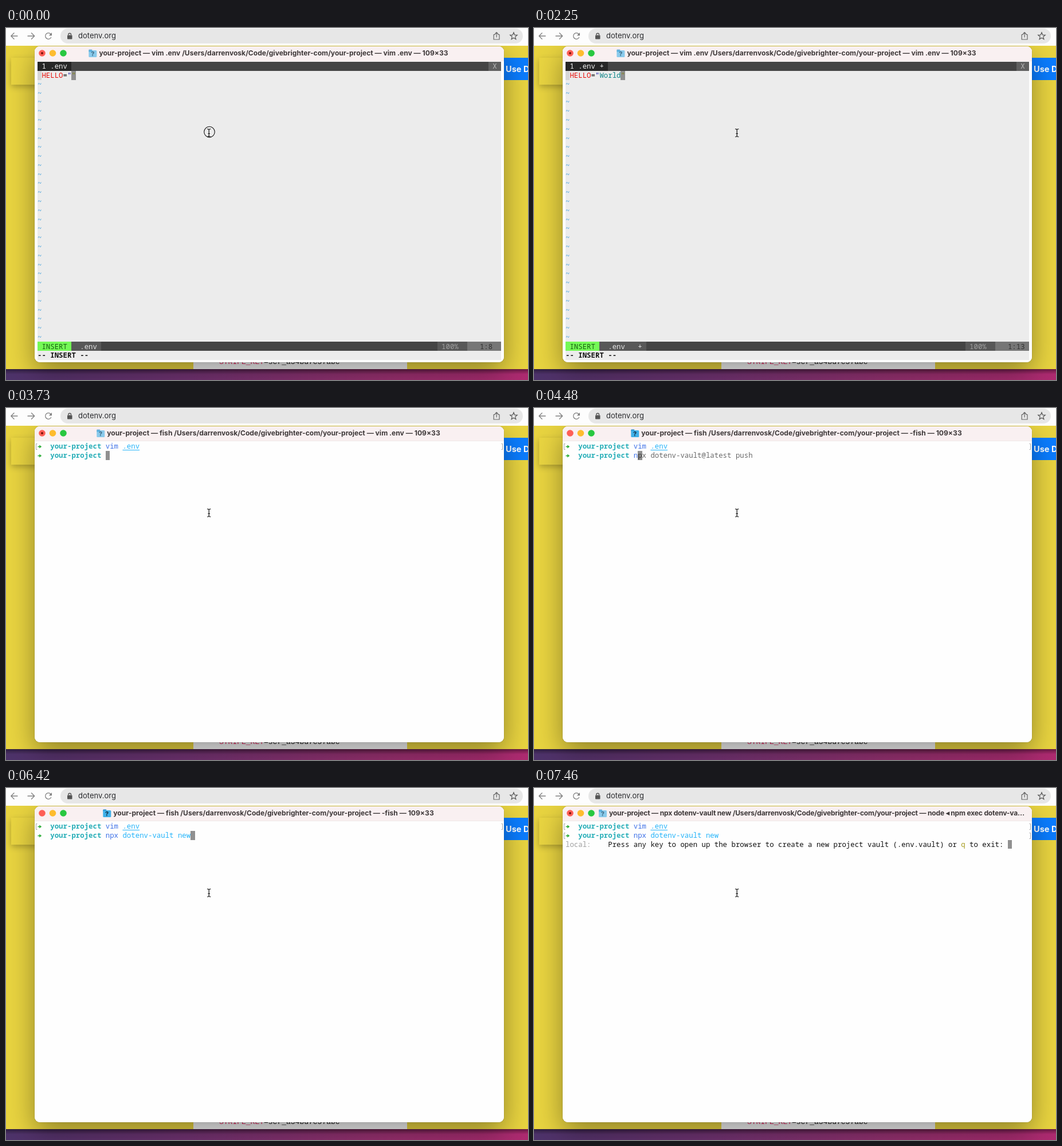
Recreate the animation shown at these times as an HTML page with a canvas. Size 911 by 615 pixels, loop 8 s.

```html
<!DOCTYPE html>
<html lang="en">
<head>
<meta charset="utf-8">
<title>Terminal session</title>
<style>
  html, body { margin: 0; width: 100%; height: 100%; overflow: hidden; background: #e8d33f; }
  canvas { display: block; width: 911px; height: 615px; }
</style>
</head>
<body>
<canvas id="stage" width="911" height="615"></canvas>
<script>
const W = 911, H = 615, LOOP = 8000;
const MONO = '"Noto Sans Mono", "DejaVu Sans Mono", monospace';
const SANS = 'Inter, "Open Sans", sans-serif';
const WIN = { x: 50, y: 32, w: 819, h: 552, r: 9 };
const PAGE = { top: 31, bottom: 596 };
const GRID = { x: 55, y: 59, cw: 7.422, rh: 15.79, cols: 109 };
const GRAY = '#909090';

const stage = document.getElementById('stage');
let g = stage.getContext('2d');

const colX = c => GRID.x + c * GRID.cw;
const rowY = r => GRID.y + r * GRID.rh;

// Last entry whose time has come
const latest = (steps, t) => steps.findLast(s => s[0] <= t);

function rect(x, y, w, h, color) {
  g.fillStyle = color;
  g.fillRect(x, y, w, h);
}

function roundRect(x, y, w, h, r, color) {
  g.fillStyle = color;
  g.beginPath();
  g.roundRect(x, y, w, h, r);
  g.fill();
}

function disc(x, y, r, color) {
  g.fillStyle = color;
  g.beginPath();
  g.arc(x, y, r, 0, 7);
  g.fill();
}

// Each path is a flat list of x, y pairs.
function lines(color, width, ...paths) {
  g.strokeStyle = color;
  g.lineWidth = width;
  g.beginPath();
  for (const p of paths) {
    g.moveTo(p[0], p[1]);
    for (let i = 2; i < p.length; i += 2) g.lineTo(p[i], p[i + 1]);
  }
  g.stroke();
}

function label(str, x, y, font, color) {
  g.font = font;
  g.fillStyle = color;
  g.fillText(str, x, y);
}

// Terminal cells
function cells(row, from, to, color) {
  const x = Math.round(colX(from)), y = Math.round(rowY(row));
  rect(x, y, Math.round(colX(to)) - x, Math.round(rowY(row + 1)) - y, color);
}

function put(row, col, str, color, weight = 400) {
  g.font = `${weight} 12.37px ${MONO}`;
  g.fillStyle = color;
  const y = Math.round(rowY(row) + 12.2);
  [...str].forEach((ch, i) => {
    if (ch !== ' ') g.fillText(ch, colX(col + i), y);
  });
}

function block(row, col) {
  cells(row, col, col + 1, GRAY);
}

// Browser behind the terminal window, drawn once
function drawToolbar() {
  rect(0, 0, W, PAGE.top, '#fdfdfd');
  roundRect(95, 1, 807, 26, 13, '#e7e7e7');
  const ink = '#808080';
  g.lineCap = 'round';
  lines(ink, 1.3, [9, 14, 20, 14], [14, 8.8, 8.8, 14, 14, 19.2]);
  lines(ink, 1.3, [38, 14, 49, 14], [44.5, 8.8, 49.7, 14, 44.5, 19.2]);

  g.beginPath();
  g.arc(74, 14, 5.3, 0.5, 5.5);
  g.stroke();
  g.fillStyle = ink;
  g.beginPath();
  g.moveTo(80, 8);
  g.lineTo(80, 13.2);
  g.lineTo(74.8, 13.2);
  g.fill();

  roundRect(107, 12.5, 8.5, 7, 1, '#555');
  g.strokeStyle = '#555';
  g.lineWidth = 1.4;
  g.beginPath();
  g.arc(111.2, 11.7, 2.4, Math.PI, 0);
  g.stroke();
  label('dotenv.org', 126, 18, `400 13px ${SANS}`, '#2b2c2f');

  lines('#666', 1.2, [853.5, 11.5, 851.2, 11.5, 851.2, 20, 861, 20, 861, 11.5, 858.7, 11.5],
    [856.1, 16, 856.1, 8], [853.3, 10.4, 856.1, 7.6, 858.9, 10.4]);

  g.strokeStyle = '#555';
  g.beginPath();
  for (let i = 0; i < 10; i++) {
    const r = i % 2 ? 2.9 : 6.6, a = i * Math.PI / 5 - Math.PI / 2;
    g.lineTo(886 + r * Math.cos(a), 14.4 + r * Math.sin(a));
  }
  g.closePath();
  g.stroke();
  g.lineCap = 'butt';
}

function drawDesk() {
  const y = PAGE.bottom;
  const grad = g.createLinearGradient(0, 0, W, 0);
  grad.addColorStop(0, '#4c3269');
  grad.addColorStop(0.35, '#713271');
  grad.addColorStop(0.7, '#96306f');
  grad.addColorStop(1, '#ae2a70');
  rect(0, y, W, H - y, grad);
  const shade = g.createLinearGradient(0, y, 0, y + 9);
  shade.addColorStop(0, 'rgba(0,0,0,.4)');
  shade.addColorStop(1, 'rgba(0,0,0,0)');
  rect(0, y, W, 9, shade);
}

function withShadow(color, blur, dy, draw) {
  g.save();
  g.shadowColor = color;
  g.shadowBlur = blur;
  g.shadowOffsetY = dy;
  draw();
  g.restore();
}

function drawBackdrop() {
  rect(0, 0, W, H, '#e9d440');
  withShadow('rgba(0,0,0,.25)', 10, 4, () => rect(9, 52, 48, 47, '#ead541'));
  rect(850, 52, 61, 39, '#0a7cff');
  label('Use Dotenv', 872, 77, `700 14.6px ${SANS}`, '#fff');

  rect(327, 560, 373, PAGE.bottom - 560, '#f4f4f4');
  const code = '13px "Liberation Mono", monospace';
  label('STRIPE_KEY', 372, 587, code, '#e0245e');
  label('=scr_a34bd7c57abc', 450, 587, code, '#111');
  drawDesk();

  withShadow('rgba(0,0,0,.38)', 48, 17,
    () => roundRect(WIN.x, WIN.y, WIN.w, WIN.h, WIN.r, '#fff'));
  drawToolbar();
  roundRect(WIN.x - 0.5, WIN.y - 0.5, WIN.w + 1, WIN.h + 1, WIN.r, 'rgba(0,0,0,.15)');
  roundRect(WIN.x, WIN.y, WIN.w, WIN.h, WIN.r, '#fefefe');
  roundRect(WIN.x, WIN.y, WIN.w, 26, [WIN.r, WIN.r, 0, 0], '#f9f0f1');
  rect(WIN.x, 57.5, WIN.w, 0.5, '#e4dcdc');
}

const backdrop = document.createElement('canvas');
backdrop.width = W;
backdrop.height = H;

// Title bar
const HOME = '/Users/darrenvosk/Code/givebrighter-com/your-project';
const titles = [
  [0, `vim .env ${HOME} — vim .env — 109×33`, true],
  [3730, `fish ${HOME} — vim .env — 109×33`, true],
  [3880, `fish ${HOME} — -fish — 109×33`, false],
  [6860, `npx dotenv-vault new ${HOME} — node ◂ npx dotenv-vault n…`, true],
  [7460, `npx dotenv-vault new ${HOME} — node ◂ npm exec dotenv-va…`, true],
];

function drawFolder(x, busy) {
  g.globalAlpha = busy ? 0.6 : 1;
  roundRect(x, 37.5, 6, 4, 1, '#2088c4');
  roundRect(x, 39, 14, 12, 1.5, '#3fb0e8');
  label('?', x + 3.8, 49, `700 11px ${SANS}`, '#0f2c42');
  g.globalAlpha = 1;
}

function drawTitle(t) {
  const [, text, busy] = latest(titles, t);
  ['#fe5f57', '#febc2e', '#28c840'].forEach((c, i) => disc(63 + i * 18.5, 44, 5.8, c));
  if (busy) disc(63, 44, 2, '#7d1109');

  const str = 'your-project — ' + text;
  const left = 113, right = 862, gap = 18;
  g.font = `700 12.1px ${SANS}`;
  // Long titles are set tighter.
  if (g.measureText(str).width > right - left - gap) g.letterSpacing = '-0.2px';
  const x = Math.max(left, 458 - (g.measureText(str).width + gap) / 2);
  label(str, x + gap, 48.3, g.font, '#3e393a');
  g.letterSpacing = '0px';
  drawFolder(x, busy);
}

// Editor
const words = [[0, ''], [900, 'W'], [1500, 'Wo'], [1800, 'Wor'], [2100, 'Worl'], [2250, 'World']];
const commands = [[0, ''], [2990, ':'], [3140, ':w'], [3290, ':wq']];

function drawEditor(t) {
  const word = latest(words, t)[1];
  const command = latest(commands, t)[1];
  const insert = t < 2700, dirty = word !== '';
  const end = GRID.cols;

  rect(55, 59, 809, 521, '#ececec');

  cells(0, 0, end, '#444444');
  cells(0, 0, dirty ? 10 : 8, '#262626');
  put(0, 1, dirty ? '1 .env +' : '1 .env', '#eeeeee');
  cells(0, 106, end, '#606060');
  put(0, 107, 'X', '#bcbcbc');

  cells(1, 0, 1, '#d6d6d6');
  const caret = insert ? 8 + word.length : 12;
  if (!command) block(1, caret);
  put(1, 1, 'HELLO', '#e8100c');
  put(1, 6, '=', '#111');
  put(1, 7, '"', '#1a1aa8');
  put(1, 8, word, '#0c8588');
  put(1, 8 + word.length, '"', insert ? '#7c8212' : '#0c6f78');
  for (let r = 2; r < 31; r++) put(r, 0, '~', '#4ba3dc');

  cells(31, 0, end, '#444444');
  cells(31, 0, 8, insert ? '#74f956' : '#82d3fb');
  put(31, 1, insert ? 'INSERT' : 'NORMAL', insert ? '#17600f' : '#1a4a66');
  cells(31, 8, dirty ? 19 : 15, '#585858');
  put(31, 10, dirty ? '.env   +' : '.env', '#e4e4e4');
  cells(31, 94, 101, '#585858');
  put(31, 95, '100%', '#a0a0a0');
  cells(31, 101, end, '#767676');
  put(31, 104, `1:${caret}`, '#303030');

  if (insert) put(32, 0, '-- INSERT --', '#111', 700);
  else if (command) {
    put(32, 0, command, '#111');
    block(32, command.length);
  }
}

// Shell
const FULL = 'npx dotenv-vault new';
const HINT = 'npx dotenv-vault@latest push';
// Time and number of typed characters
const keys = [
  [0, 0], [4480, 1], [4630, 3], [4780, 5], [4930, 7], [5080, 9], [5230, 11],
  [5830, 13], [5980, 15], [6130, 16], [6280, 18], [6420, 20],
];

function brackets(row) {
  const y = Math.round(rowY(row)) + 3.5;
  lines('#a8a8a8', 1, [54.5, y, 52.5, y, 52.5, y + 10, 54.5, y + 10],
    [864.5, y, 866.5, y, 866.5, y + 10, 864.5, y + 10]);
}

function prompt(row) {
  const y = Math.round(rowY(row)) + 8.5;
  lines('#2fae3a', 1.6, [55.5, y, 59.5, y]);
  g.fillStyle = '#2fae3a';
  g.beginPath();
  g.moveTo(58.2, y - 3);
  g.lineTo(62.2, y);
  g.lineTo(58.2, y + 3);
  g.fill();
  put(row, 3, 'your-project', '#27aeb8', 700);
}

function drawShell(t) {
  const blue = '#3f72e8', sky = '#24b4fa';
  brackets(0);
  prompt(0);
  put(0, 16, 'vim', blue);
  put(0, 20, '.env', sky);
  rect(colX(20), 73, 4 * GRID.cw, 1, sky);

  prompt(1);
  const n = latest(keys, t)[1];
  const sent = t >= 6860;
  if (!sent) block(1, 16 + n);
  put(1, 16, FULL.slice(0, Math.min(n, 3)), blue);
  put(1, 20, FULL.slice(4, Math.max(n, 4)), sky);
  if (n > 0 && n < FULL.length) {
    const hint = n > 16 ? FULL : HINT;
    put(1, 16 + n, hint.slice(n), '#6a6a6a');
    put(1, 16 + n, hint[n], '#444');
  }
  if (!sent) return;

  brackets(1);
  if (t < 7460) return block(2, 0);
  const ask = 'Press any key to open up the browser to create a new project vault (.env.vault) or ';
  put(2, 0, 'local:', '#a0a0a0');
  put(2, 10, ask, '#111');
  put(2, 10 + ask.length, 'q', '#a59a1c');
  put(2, 11 + ask.length, ' to exit:', '#111');
  block(2, 104);
}

function drawPointer(t) {
  if (t < 150) {
    g.strokeStyle = '#111';
    g.lineWidth = 1.1;
    g.beginPath();
    g.arc(355, 181.6, 9.3, 0, 7);
    g.stroke();
  }
  lines('#111', 1.2, [351, 176.5, 353, 176.5, 354.2, 178, 355.4, 176.5, 357.4, 176.5],
    [354.2, 178, 354.2, 188.5],
    [351, 190, 353, 190, 354.2, 188.5, 355.4, 190, 357.4, 190], [352.4, 184.5, 356, 184.5]);
}

function frame(now) {
  const t = Math.max(0, now - start) % LOOP;
  g.drawImage(backdrop, 0, 0);
  drawTitle(t);
  if (t < 3730) drawEditor(t);
  else drawShell(t);
  drawPointer(t);
  requestAnimationFrame(frame);
}

const screen2d = g;
g = backdrop.getContext('2d');
drawBackdrop();
g = screen2d;

const start = performance.now();
frame(start);
</script>
</body>
</html>
```
